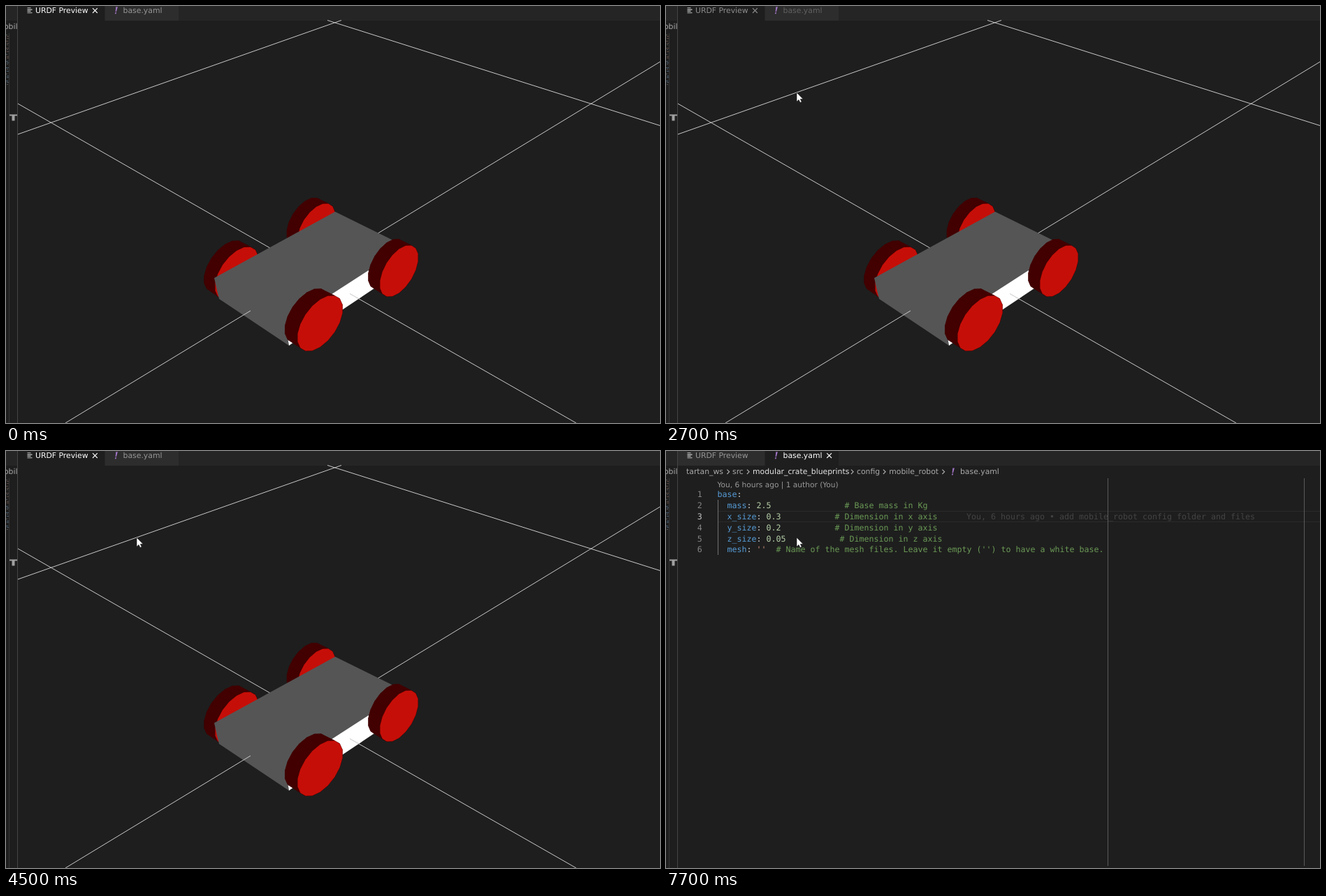
Animation, 936 px wide and 598 px high, one loop 8 s. Source, as an HTML page:

```html
<!DOCTYPE html>
<html lang="en">
<head>
<meta charset="utf-8">
<title>Robot preview</title>
<style>
  html, body { margin: 0; width: 100%; height: 100%; overflow: hidden; background: #1e1e1e; }
  svg { display: block; width: 936px; height: 598px; }
  text { font: 10.83px "DejaVu Sans", sans-serif; white-space: pre; text-rendering: geometricPrecision; }
  .code text { font: 11.63px "DejaVu Sans Mono", monospace; }
  text.lens { font-size: 10.6px; fill: #999; }
  rect { shape-rendering: crispEdges; }
  .crumb { fill: #a9a9a9; }
  .stroke { fill: none; stroke-width: 1.1; }
  .grid { stroke: #c8c8c8; stroke-width: 1; fill: none; }

  .anim, .anim * { animation-duration: 8s; animation-timing-function: step-end; animation-iteration-count: infinite; }
  #preview { animation-name: preview; }
  #editor { animation-name: editor; }
  #axes { animation-name: axes; }
  #slider { animation-name: slider; }
  #pointer { animation-name: pointer; }
  #blame { animation-name: blame; }
  #caret { animation-name: caret; }
  .tab1 { animation-name: tab1; }
  .tab2 { animation-name: tab2; }

  @keyframes preview { 0% { visibility: visible } 66.25%, 100% { visibility: hidden } }
  @keyframes editor { 0% { opacity: 0 } 66.25%, 100% { opacity: 1 } }
  @keyframes axes { 0% { opacity: 0 } 12.5% { opacity: 1 } 23.75%, 100% { opacity: 0 } }
  @keyframes slider { 0% { opacity: 0 } 41.25% { opacity: 1 } 53.75%, 100% { opacity: 0 } }
  @keyframes blame { 0% { opacity: 0 } 68.75%, 100% { opacity: 1 } }
  @keyframes caret {
    0% { opacity: 1 } 71.25% { opacity: 0 } 77.5% { opacity: 1 }
    85% { opacity: 0 } 90% { opacity: 1 } 96.25%, 100% { opacity: 0 }
  }
  @keyframes pointer {
    0% { opacity: 0; transform: translate(179.5px, 108.5px) }
    6.25% { opacity: 1; transform: translate(179.5px, 108.5px) }
    7.5%, 100% { opacity: 1; transform: translate(187px, 124px) }
  }
  @keyframes tab1 { 0% { color: #fff } 33.75% { color: #8e8e8e } 56.25% { color: #fff } 66.25%, 100% { color: #969696 } }
  @keyframes tab2 { 0% { color: #969696 } 33.75% { color: #616161 } 56.25% { color: #969696 } 66.25%, 100% { color: #fff } }
</style>
</head>
<body>
<svg class="anim" viewBox="0 0 936 598">
  <defs>
    <path id="bang" d="M1.7 0H4.3L2.3 7H1ZM.8 8H2.5L2 10H.2Z" fill="#a074c4"/>
    <path id="close" class="stroke" d="M-3.4-3.4 3.4 3.4M3.4-3.4-3.4 3.4" stroke="currentColor"/>
    <path id="chevron" class="stroke" d="M-1.6-3.2 1.6 0-1.6 3.2" stroke="#b5b5b5"/>
    <clipPath id="pane"><rect width="16" height="598"/></clipPath>
  </defs>
  <rect width="936" height="598" fill="#1e1e1e"/>
  <rect width="936" height="21" fill="#252526"/>

  <g id="preview">
    <rect x="17" width="124" height="21" fill="#1e1e1e"/>
    <rect x="142" width="105" height="21" fill="#2d2d2d"/>
    <use href="#close" class="tab1" x="127.4" y="6.6"/>
    <path class="grid" d="M460 20.5 936 171.5M480 20.5 17 184M17 140 492 412.5M936 80 350 437"/>
    <g id="far"></g>
    <path d="M298 390 471 295 556 337 519 379 400 456 405 487 305 420 302 408Z" fill="#555"/>
    <path d="M519 379 527 405 412 482 405 487 400 456Z" fill="#fff"/>
    <path class="grid" d="M492 412.5 816 598M350 437 85 598"/>
    <g id="near"></g>
    <g id="axes" stroke-width="2.6">
      <path d="M622.5 414V379" stroke="#1400ee"/>
      <path d="M622.5 368 627 380H618Z" fill="#1400ee"/>
      <path d="M621 416 592 436" stroke="#dc140a"/>
      <path d="M584 441.5 590.5 432 595.5 439.5Z" fill="#dc140a"/>
      <path d="M624.5 416 657 432.5" stroke="#3cff3c"/>
      <path d="M666.5 437.5 655 436.6 659 428.8Z" fill="#3cff3c"/>
    </g>
  </g>

  <g id="editor">
    <rect x="17" width="124" height="21" fill="#2d2d2d"/>
    <rect x="142" width="105" height="21" fill="#1e1e1e"/>
    <use href="#close" class="tab2" x="233.6" y="6.6"/>
    <g id="crumbs" class="crumb"></g>
    <use href="#bang" x="408.6" y="24.5"/>
    <text class="lens" x="73.5" y="52.3">You, 6 hours ago | 1 author (You)</text>
    <rect x="74" y="86" width="862" height="1" fill="#2a2a2a"/>
    <rect x="74" y="101" width="862" height="1" fill="#2a2a2a"/>
    <rect x="74" y="70" width="1" height="79" fill="#707070"/>
    <rect x="632" y="39" width="1" height="556" fill="#5a5a5a"/>
    <rect x="913" y="39" width="1" height="556" fill="#5a5a5a"/>
    <g id="code" class="code"></g>
    <g id="blame" class="code"><text x="430" y="98" fill="#444">You, 6 hours ago • add mobile_robot config folder and files</text></g>
    <rect id="caret" x="164" y="86" width="2" height="16" fill="#aeafad"/>
  </g>

  <path class="stroke" d="M30.5 2.8H35.5M30.5 5.1H37.5M30.5 7.4H35.5M30.5 9.7H37.5" stroke="#c5c8c6"/>
  <text class="tab1" x="42" y="10.3" fill="currentColor">URDF Preview</text>
  <use href="#bang" x="155.6" y="1.2"/>
  <text class="tab2" x="167.6" y="10.3" fill="currentColor">base.yaml</text>

  <g clip-path="url(#pane)">
    <text class="crumb" x="-3" y="33.3">obil</text>
    <g id="minimap"></g>
    <rect x="4" y="39" width="1" height="559" fill="#353535"/>
    <rect id="slider" x="4" y="39" width="12" height="383" fill="#424240"/>
    <path d="M5 155.5H16V157.5H12.5V164.5H8.5V157.5H5Z" fill="#a0a0a0"/>
  </g>
  <rect x="16" width="1" height="598" fill="#444"/>

  <path id="pointer" d="M0 0V13.2L3 10.5 5 14.5 7.2 13.5 5.3 9.6H9.2Z" fill="#fff" stroke="#111" stroke-width=".6"/>
</svg>
<script>
  const $ = id => document.getElementById(id);

  function add(parent, tag, attrs, text) {
    const el = document.createElementNS("http://www.w3.org/2000/svg", tag);
    for (const key in attrs) el.setAttribute(key, attrs[key]);
    if (text) el.textContent = text;
    parent.append(el);
    return el;
  }

  // A wheel is a prism: the rim joins an inner ring to the visible face.
  function wheel(parent, cx, cy, w, lean, rise, dx, dy) {
    const sides = 18;
    const ring = (x, y, k) => Array.from({ length: sides }, (_, i) => {
      const a = (i + 0.5) / sides * 2 * Math.PI;
      return [x + k * w * Math.cos(a), y - k * (lean * Math.cos(a) + rise * Math.sin(a))];
    });
    const face = ring(cx, cy, 1), back = ring(cx + dx, cy + dy, 0.97);
    const rim = { fill: "#420000", stroke: "#420000", "stroke-width": 0.5 };
    const poly = (pts, style) => add(parent, "polygon", { points: pts.join(" "), ...style });
    poly(back, rim);
    face.forEach((p, i) => {
      const j = (i + 1) % sides;
      poly([p, face[j], back[j], back[i]], rim);
    });
    poly(face, { fill: "#c60e08" });
  }
  wheel($("far"), 444, 318, 27, 18, 30, -16, -9);
  wheel($("far"), 330, 383, 31, 20, 32, -16.5, -10);
  wheel($("near"), 562.5, 380, 27.5, 19.5, 31.4, -17.5, -10);
  wheel($("near"), 449.5, 455, 32.5, 21, 34, -19, -11);

  const crumbs = [
    [29, "tartan_ws", 89], [95, "src", 117.5], [124, "modular_crate_blueprints", 266.5],
    [273, "config", 312.5], [319.3, "mobile_robot", 397], [421, "base.yaml"]
  ];
  crumbs.forEach(([x, name, next], i) => {
    add($("crumbs"), "text", { x, y: 33.3, fill: i === 2 ? "#e4e4e4" : "#a9a9a9" }, name);
    if (next) add($("crumbs"), "use", { href: "#chevron", x: next, y: 29.8 });
  });

  // indent, key, value, comment column, comment
  const rows = [
    [0, "base", ""],
    [2, "mass", "2.5", 26, "# Base mass in Kg"],
    [2, "x_size", "0.3", 24, "# Dimension in x axis"],
    [2, "y_size", "0.2", 24, "# Dimension in y axis"],
    [2, "z_size", "0.05", 25, "# Dimension in z axis"],
    [2, "mesh", "''", 12, "# Name of the mesh files. Leave it empty ('') to have a white base."]
  ];
  rows.forEach(([indent, key, value, col, note], i) => {
    const y = 66.3 + i * 15.83;
    const put = (c, fill, s) => add($("code"), "text", { x: 73.5 + c * 7, y, fill }, s);
    put(-4.1, i === 2 ? "#c6c6c6" : "#858585", String(i + 1));
    put(indent, "#569cd6", key);
    put(indent + key.length, "#d4d4d4", ":");
    if (value) put(indent + key.length + 2, value === "''" ? "#ce9178" : "#b5cea8", value);
    if (note) put(col, "#6a9955", note);
  });

  for (let i = 0; i < 32; i++) {
    if (i % 4 === 3) continue;
    add($("minimap"), "rect", {
      x: i % 4 === 0 ? 0 : 1, y: 41 + i * 2.35, width: 2 + i * 7 % 3, height: 1,
      fill: i < 16 ? (i % 3 ? "#57453c" : "#4d4d4d") : (i % 3 ? "#42586a" : "#505050")
    });
  }
</script>
</body>
</html>
```
